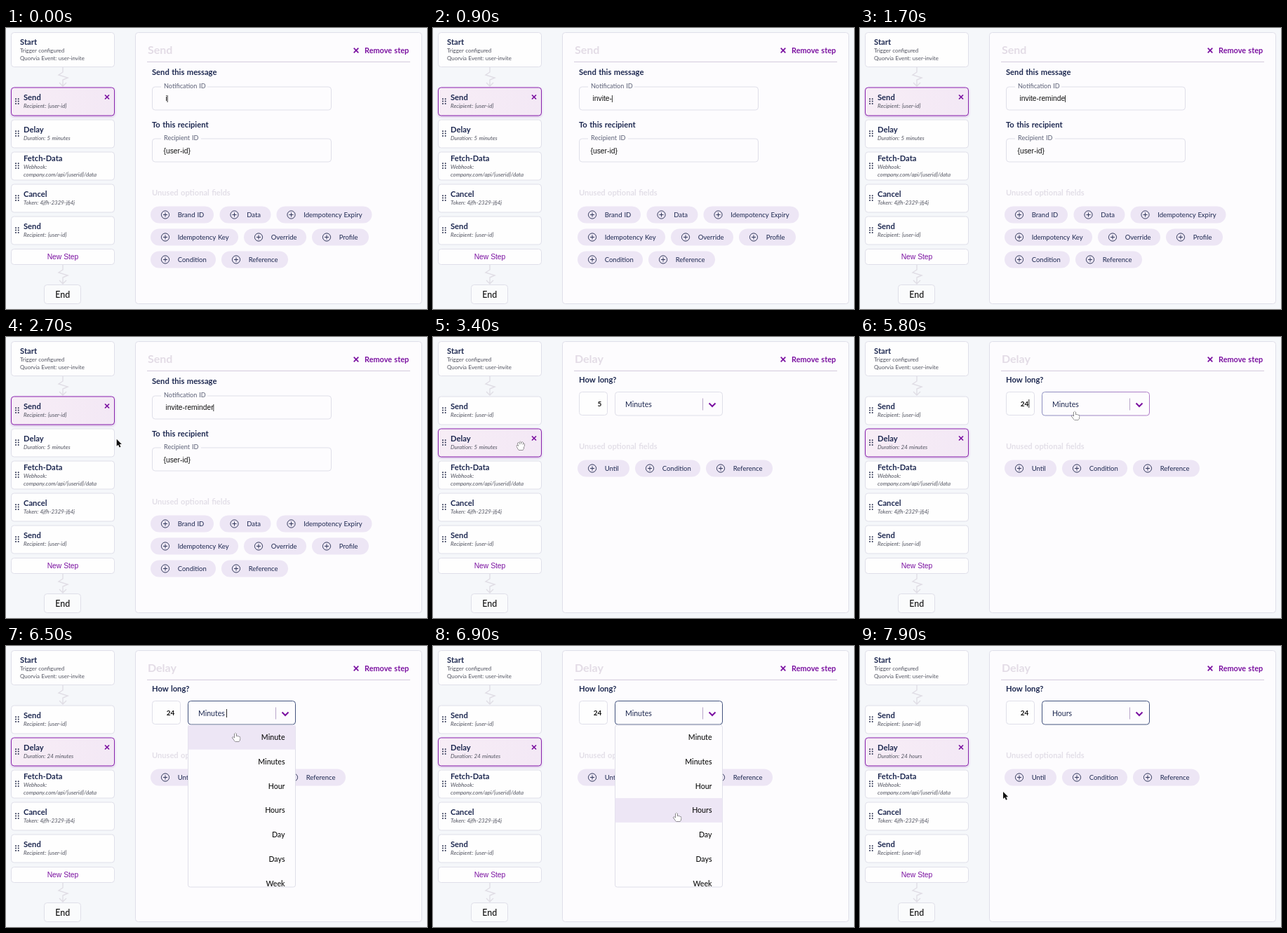
Write an HTML page that moves like this. It is 600x401 px and loops after 8000 ms.

```html
<!DOCTYPE html>
<html lang="en">
<head>
<meta charset="utf-8">
<title>Workflow editor</title>
<style>
  html, body { margin: 0; width: 100%; height: 100%; overflow: hidden; background: #f5f7fa; }
  svg { display: block; width: 600px; height: 401px; }
  text { font-family: Lato, "Open Sans", sans-serif; word-spacing: .06em; fill: #1d2850; white-space: pre; }
  .head { font-size: 11.2px; font-weight: 700; }
  .note { font-size: 7.95px; fill: #50525f; }
  .it { font-style: italic; }
  .title { font-size: 16px; font-weight: 700; fill: #e3dce6; }
  .pale { font-size: 11.1px; font-weight: 700; fill: #e3dfe8; }
  .remove { font-size: 10.9px; font-weight: 700; fill: #7a10a0; }
  .label { font-size: 9.1px; fill: #5b6076; }
  .pill { font-size: 9.5px; }
  .value { font-size: 10.5px; }
  .option { font-size: 10.6px; font-weight: 500; fill: #111; text-anchor: end; }
  .number { font-size: 10px; font-weight: 700; fill: #111; text-anchor: end; }
  .end { font-size: 12.4px; font-weight: 500; fill: #111; text-anchor: middle; }
  .plain, .new { font-family: "Liberation Sans", Arial, sans-serif; font-size: 10.3px; word-spacing: 0; fill: #111; }
  .new { fill: #7a10a0; text-anchor: middle; }
</style>
</head>
<body>
<svg id="stage" viewBox="0 0 600 401"></svg>
<script>
const LOOP = 8000, STEP = 100;
const PURPLE = '#7a10a0', LINE = '#dfdfe9', NAVY = '#44547f', PANEL = '#fdfcfe';
const CLICK_CARD = 3000, CLEAR = 4300, FIRST_DIGIT = 4500, SECOND_DIGIT = 4800, OPEN = 6200, PICK = 7300;
const UNITS = ['Minute', 'Minutes', 'Hour', 'Hours', 'Day', 'Days', 'Week'];
const ROW = 34.7, LIST_TOP = 113;

// Pointer routes: [time, x, y]
const ROUTES = [
  [[2200, 290, 108], [2900, 125, 155], [3700, 125, 155], [4100, 238, 99], [4300, 238, 99]],
  [[5200, 238, 99], [5800, 306, 106], [6200, 306, 106], [6500, 327, 124],
   [6900, 347, 238], [7400, 347, 238], [7900, 204, 208], [8000, 204, 208]]
];

const text = (cls, x, y, s) => `<text class="${cls}" x="${x}" y="${y}">${s}</text>`;
const box = (x, y, w, h, fill = '#fefefe', stroke = LINE, r = 4, extra = '') =>
  `<rect x="${x}" y="${y}" width="${w}" height="${h}" rx="${r}" fill="${fill}" stroke="${stroke}" ${extra}/>`;
const path = (d, stroke, width = 1, extra = '') =>
  `<path d="${d}" fill="none" stroke="${stroke}" stroke-width="${width}" ${extra}/>`;
const cross = (x, y, r) =>
  path(`M${x - r} ${y - r}l${2 * r} ${2 * r}m0 ${-2 * r}l${-2 * r} ${2 * r}`, PURPLE, 1.7);
const caret = (x, y) => path(`M${x} ${y}v12`, '#111', .9);
const arrow = y =>
  path(`M81 ${y}v7l-6 4l13 4l-7 3v9m-5 -5l5 5l5 -5`, '#e0dde5', 1.4);

function card(y, name, lines, active) {
  let s = active
    ? box(7.5, y, 147, 40, 'url(#active)', '#8a25ad', 4, 'filter="url(#shadow)"')
    : box(7.5, y, 147, 40);
  for (let i = 0; i < 6; i++)
    s += `<circle cx="${14 + i % 2 * 3.7}" cy="${y + 16.2 + (i >> 1) * 3.4}" r="1" fill="#2a3050"/>`;
  const top = y + (lines.length > 1 ? 13 : 18);
  s += text('head', 25, top, name);
  lines.forEach((l, i) => s += text('note it', 25, top + 11 + i * 10.6, l));
  return s + (active ? cross(144, y + 13.5, 3) : '');
}

function pill(x, y, w, label) {
  const cx = x + 21, cy = y + 12;
  return `<rect x="${x}" y="${y}" width="${w}" height="24" rx="12" fill="#ede6f5"/>` +
    `<circle cx="${cx}" cy="${cy}" r="5.6" fill="none" stroke="#333a5c"/>` +
    path(`M${cx - 3} ${cy}h6m-3 -3v6`, '#333a5c') + text('pill', x + 38.7, y + 15.2, label);
}

const field = (y, label, w) => box(208.5, y, 255, 33, PANEL) +
  `<rect x="221" y="${y - 2}" width="${w}" height="4" fill="${PANEL}"/>` + text('label', 225, y + 2.2, label);

function sendPanel(t) {
  const typed = 'invite-reminder'.slice(0, 1 + Math.floor(t / 130));
  return text('title', 202, 37, 'Send') +
    text('head', 208, 67, 'Send this message') + field(84, 'Notification ID', 66) +
    text('plain', 227.5, 104.3, typed + '<tspan dx="-1">|</tspan>') +
    text('head', 208, 142, 'To this recipient') + field(158, 'Recipient ID', 57) +
    text('plain', 224.5, 178.5, '{user-id}') +
    text('pale', 208, 239, 'Unused optional fields') +
    pill(206, 254.5, 90, 'Brand ID') + pill(304.5, 254.5, 73, 'Data') + pill(385.5, 254.5, 136, 'Idempotency Expiry') +
    pill(206, 286.5, 125, 'Idempotency Key') + pill(339, 286.5, 89, 'Override') + pill(436, 286.5, 81, 'Profile') +
    pill(206, 318.5, 93, 'Condition') + pill(307, 318.5, 95, 'Reference');
}

function delayPanel(t, amount, mouse) {
  const open = t >= OPEN && t < PICK;
  const hover = t > 5000 && mouse && mouse.x >= 259;
  const border = t >= OPEN ? NAVY : hover ? 'url(#hover)' : LINE;
  const editing = t >= 4100 && t < OPEN;
  let s = text('title', 202, 37, 'Delay') + text('head', 208, 65, 'How long?') +
    box(208.5, 78.5, 40, 33) + text('number', 240.3, 99, amount) + (editing ? caret(240.8, 89) : '') +
    box(259.5, 78.5, 153, 33.5, PANEL, border) +
    text('value', 274, 99.5, t < PICK ? 'Minutes' : 'Hours') +
    (open && t < 6700 ? caret(314.5, 90) : '') +
    path('M384.5 87.5v17', '#b9a6cb') + path('M393.5 94.5l4.5 4.5l4.5 -4.5', PURPLE, 2) +
    text('pale', 208, 160, 'Unused optional fields') +
    pill(206, 175.5, 74, 'Until') + pill(288, 175.5, 93, 'Condition') + pill(389, 175.5, 95, 'Reference');
  if (open) {
    const at = Math.max(0, Math.floor((mouse.y - LIST_TOP) / ROW));
    s += box(259.5, LIST_TOP, 153, 231, PANEL, LINE, 3) +
      `<rect x="259.5" y="${LIST_TOP + at * ROW}" width="153" height="${ROW}" fill="#ede6f5"/>` +
      '<g clip-path="url(#list)">' +
      UNITS.map((u, i) => text('option', 397.5, 134.3 + i * ROW, u)).join('') + '</g>';
  }
  return s;
}

function mouseAt(t) {
  const r = ROUTES.find(r => t >= r[0][0] && t < r[r.length - 1][0]);
  if (!r) return null;
  const i = r.findIndex(k => k[0] > t), [t0, x0, y0] = r[i - 1], [t1, x1, y1] = r[i];
  const p = (t - t0) / (t1 - t0), e = p * p * (3 - 2 * p);
  return { x: x0 + (x1 - x0) * e, y: y0 + (y1 - y0) * e };
}

function pointer(m, t) {
  if (!m) return '';
  let d, fill = '#fff', line = '#222';
  if (m.x < 155 && m.y > 131)
    d = 'M-3 6L-5.5 1.5Q-6.5 -.5 -4.8 -.5L-3 1L-4.3 -3.6Q-3.6 -5.2 -2.5 -3.8L-1.6 -1V-5Q-.6 -6.4 .3 -5L.5 -1.2L1.4 -4.7Q2.7 -5.8 3.1 -4.4L2.8 -.8L4.1 -2.8Q5.7 -3.2 5.4 -1.6L4.3 3L3.4 6Z';
  else if (t > 5000 && t <= 7400 && m.x >= 259)
    d = 'M-1.2 1Q0 -1 1.2 1V5Q2.3 4 3.2 5.2Q4.2 4.4 5 5.6Q6.5 5 6.6 6.6V9L5.4 12H-.6L-4 7.6Q-4.8 5.8 -3 6L-1.2 7.6Z';
  else {
    d = 'M0 0V10L2.3 8L4 11.8L5.8 11L4.1 7.3H7.2Z';
    fill = '#111';
    line = '#fff';
  }
  return `<path transform="translate(${m.x} ${m.y})" d="${d}" fill="${fill}" stroke="${line}" stroke-width=".9" stroke-linejoin="round" paint-order="stroke"/>`;
}

const DEFS = `<defs>
  <linearGradient id="active"><stop stop-color="#f7edf6"/><stop offset="1" stop-color="#f3e8f5"/></linearGradient>
  <linearGradient id="hover"><stop stop-color="#8d8fc0"/><stop offset="1" stop-color="#b07cc8"/></linearGradient>
  <filter id="shadow"><feDropShadow dx="0" dy="1.5" stdDeviation="1.5" flood-color="#8a25ad" flood-opacity=".3"/></filter>
  <clipPath id="list"><path d="M259 113h153v230.5h-153z"/></clipPath></defs>`;

function scene(t) {
  const delay = t >= CLICK_CARD, mouse = mouseAt(t);
  const amount = t < CLEAR ? '5' : t < FIRST_DIGIT ? '' : t < SECOND_DIGIT ? '2' : '24';
  const unit = t < PICK ? 'minutes' : 'hours';
  return DEFS + box(7.5, 6.5, 147, 49) + text('head', 20, 24, 'Start') +
    text('note', 20, 35, 'Trigger configured') + text('note', 20, 45.6, 'Quorvia Event: user-invite') +
    arrow(56) +
    card(85, 'Send', ['Recipient: {user-id}'], !delay) +
    card(131, 'Delay', [`Duration: ${amount} ${unit}`], delay) +
    card(177, 'Fetch-Data', ['Webhook:', 'company.com/api/{userid}/data']) +
    card(223, 'Cancel', ['Token: 4jfh-2329-jfj4j']) +
    card(269, 'Send', ['Recipient: {user-id}']) +
    box(7.5, 315.5, 147, 22) + text('new', 81, 330, 'New Step') +
    arrow(338) + box(54.5, 366.5, 52, 27, '#fafbfc') + text('end', 80.7, 384.7, 'End') +
    box(184.5, 6.5, 408, 387, PANEL) + path('M201 48.3h375', '#d3c9da') +
    cross(499, 32, 3.3) + text('remove', 511, 36, 'Remove step') +
    (delay ? delayPanel(t, amount, mouse) : sendPanel(t)) + pointer(mouse, t);
}

const stage = document.getElementById('stage');
let shown = -1;
function tick() {
  const t = Math.floor(performance.now() % LOOP / STEP) * STEP;
  if (t !== shown) stage.innerHTML = scene(shown = t);
  requestAnimationFrame(tick);
}
tick();
</script>
</body>
</html>
```
